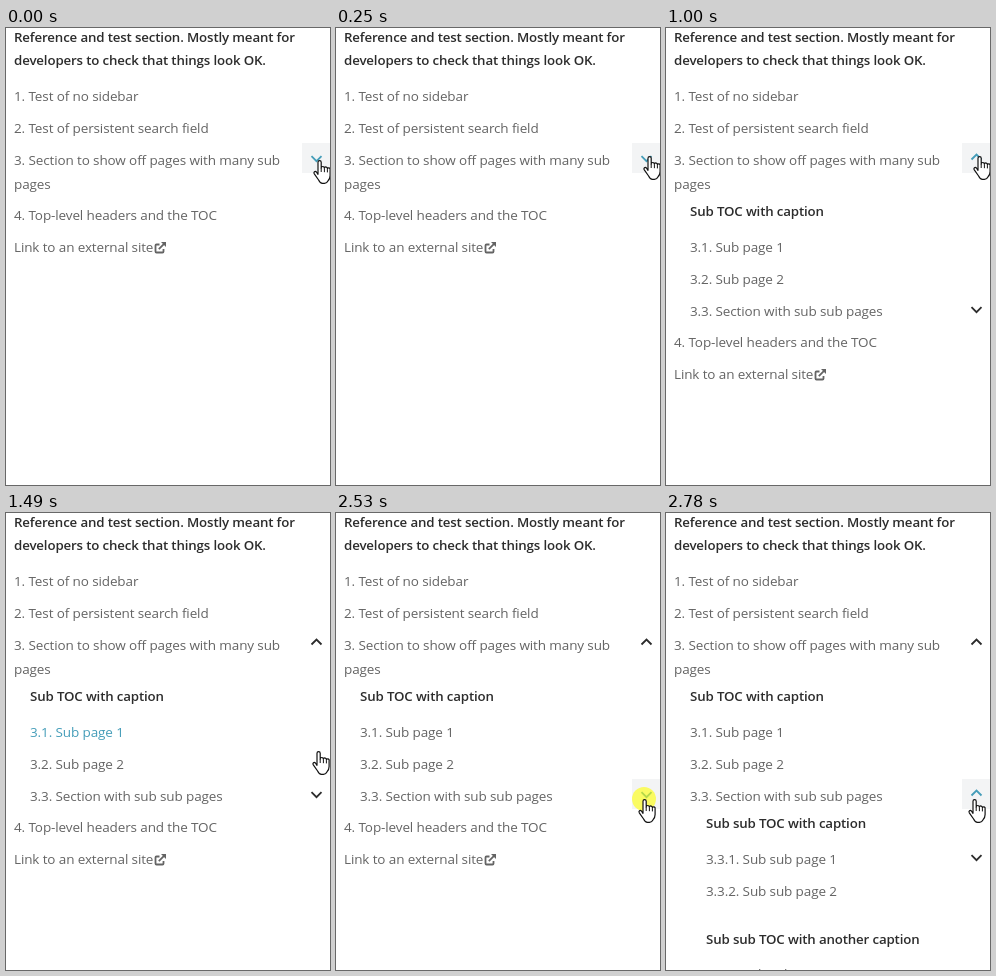
Write an HTML page that moves like this. It is 324 px wide and 457 px high and loops after 4.04 s.

```html
<!DOCTYPE html>
<html lang="en">
<head>
<meta charset="utf-8">
<title>Sidebar navigation</title>
<style>
  html, body { margin: 0; width: 100%; height: 100%; overflow: hidden; background: #fff; }
  svg { display: block; width: 100%; height: 100%; }
  text { font: 13.5px "Open Sans", "Noto Sans", sans-serif; letter-spacing: -.12px; fill: #646464; }
  text.caption { font-size: 13.3px; font-weight: 600; letter-spacing: -.15px; fill: #2c2c2c; }
  text.hover { fill: #459db9; }
  .line { fill: none; stroke-width: 1.8; }
</style>
</head>
<body>
<svg id="stage" viewBox="0 0 324 457"></svg>
<script>
const LOOP = 4040;
const DARK = '#2c2c2c', GREY = '#646464', ACCENT = '#459db9';
const stage = document.getElementById('stage');

function add(parent, tag, attrs = {}, content = '') {
  const node = document.createElementNS('http://www.w3.org/2000/svg', tag);
  for (const key in attrs) node.setAttribute(key, attrs[key]);
  node.textContent = content;
  return parent.appendChild(node);
}
const group = () => add(stage, 'g');
const link = (parent, x, y, str) => add(parent, 'text', { x, y }, str);
const caption = (parent, x, y, str) => add(parent, 'text', { x, y, class: 'caption' }, str);
const show = (node, on) => node.setAttribute('visibility', on ? 'visible' : 'hidden');
const move = (node, x, y) => node.setAttribute('transform', `translate(${x} ${y})`);

// Expand button; y is the top of its 28 x 30 hover area
function toggle(parent, y) {
  const back = add(parent, 'rect', { x: 296, y, width: 28, height: 30, fill: '#f3f4f5' });
  const mark = add(parent, 'path', { class: 'line' });
  return (open, hover) => {
    back.setAttribute('fill-opacity', hover ? 1 : 0);
    mark.setAttribute('stroke', hover ? ACCENT : DARK);
    mark.setAttribute('d', open
      ? `M305.5 ${y + 16.5}l5-5 5 5`
      : `M305.5 ${y + 13.2}l5 5 5-5`);
  };
}

const top_ = group();
caption(top_, 8, 14, 'Reference and test section. Mostly meant for');
caption(top_, 8, 37, 'developers to check that things look OK.');
link(top_, 8, 73, '1. Test of no sidebar');
link(top_, 8, 105, '2. Test of persistent search field');
link(top_, 8, 137, '3. Section to show off pages with many sub');
link(top_, 8, 161, 'pages');
const mainToggle = toggle(top_, 115);

const tail = group();
link(tail, 8, 192, '4. Top-level headers and the TOC');
link(tail, 8, 224, 'Link to an external site');
add(tail, 'path', {
  class: 'line', stroke: GREY,
  d: 'M153.5 216.5H150.5Q149.5 216.5 149.5 217.5V223.5Q149.5 224.5 150.5 224.5H156.5Q157.5 224.5 157.5 223.5V221M152.8 221.2L158.8 215.2'
});
add(tail, 'path', { fill: GREY, d: 'M155 214H160V219Z' });

const sub = group();
caption(sub, 24, 188, 'Sub TOC with caption');
const firstPage = link(sub, 24, 224, '3.1. Sub page 1');
link(sub, 24, 256, '3.2. Sub page 2');
link(sub, 24, 288, '3.3. Section with sub sub pages');
const subToggle = toggle(sub, 266);

const subSub = group();
caption(subSub, 40, 315, 'Sub sub TOC with caption');
link(subSub, 40, 351, '3.3.1. Sub sub page 1');
link(subSub, 40, 383, '3.3.2. Sub sub page 2');
caption(subSub, 40, 431, 'Sub sub TOC with another caption');
link(subSub, 40, 466, '3.3.3. Sub sub page 3');
toggle(subSub, 329)(false, false);

const pointer = group();
const click = add(pointer, 'circle', { cx: 6, cy: 0, r: 12, fill: '#ff0', 'fill-opacity': .6 });
add(pointer, 'path', {
  fill: '#fff', stroke: '#111', 'stroke-width': 1.2, 'stroke-linejoin': 'round',
  d: 'M5 14.3V2.2a1.6 1.6 0 0 1 3.2 0V8a1.6 1.6 0 0 1 3.2.2a1.5 1.5 0 0 1 3 .7a1.4 1.4 0 0 1 2.7.8V15.5q0 3-2 5.2Q13.8 23.3 11.5 23.3H9.5Q7 23.3 5.6 20L1.3 13.8c-1-1.7.8-3.2 2.1-1.8z'
});
add(pointer, 'path', {
  fill: 'none', stroke: '#111', 'stroke-width': 1,
  d: 'M8.2 8v4M11.4 8.4v3.8M14.4 9.2v3.2'
});

// Pointer stops: start time, x, y
const stops = [
  [0, 307, 132], [250, 307, 128], [1490, 306, 238],
  [1760, 302, 283], [2010, 302, 286]
];

function draw(t) {
  const [, x, y] = stops.filter(s => s[0] <= t).pop();
  const open = t >= 1000, deep = t >= 2780;
  move(pointer, x, y);
  show(click, (t >= 750 && t < 1000) || (t >= 2530 && t < 2780));
  mainToggle(open, t < 1490);
  subToggle(deep, t >= 1760);
  firstPage.classList.toggle('hover', t >= 1490 && t < 1760);
  sub.style.display = open ? '' : 'none';
  subSub.style.display = deep ? '' : 'none';
  tail.style.display = deep ? 'none' : '';
  move(tail, 0, open ? 127 : 0);
}

const start = performance.now();
function tick() {
  draw((performance.now() - start) % LOOP);
  requestAnimationFrame(tick);
}
tick();
</script>
</body>
</html>
```
